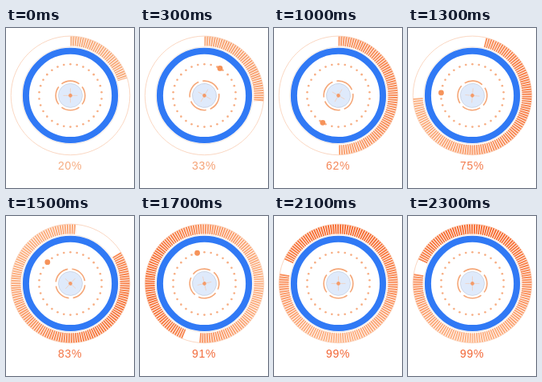
Animation, 160 px wide and 200 px high, one loop 2.4 s. Source, as an HTML page:

```html
<!DOCTYPE html>
<html>
<head>
<meta charset="utf-8">
<style>
html, body { margin: 0; width: 100%; height: 100%; overflow: hidden; background: #fff; }
svg { display: block; width: 160px; height: 200px; }
text { font: 14px "Liberation Sans", Arial, sans-serif; letter-spacing: .7px; text-anchor: middle; }
</style>
</head>
<body>
<svg viewBox="0 0 160 200">
  <defs>
    <linearGradient id="heat" gradientUnits="userSpaceOnUse" x1="70" y1="-25" x2="-70" y2="25">
      <stop id="hot" offset="0"/>
      <stop id="warm" offset="1"/>
    </linearGradient>
  </defs>
  <g fill="none" transform="translate(80.5 84.4)">
    <circle r="74.3" stroke="#f9cdb3" stroke-width=".8"/>
    <path id="ticks" stroke="url(#heat)" stroke-width="12"/>
    <circle r="60.8" stroke="#efd9d0" stroke-width=".6"/>
    <circle r="55.6" stroke="#3079f5" stroke-width="8"/>
    <g id="dots" fill="#f7ad82"></g>
    <circle id="runner" r="3.4" fill="#f6935a"/>
    <g id="core">
      <circle r="18.3" stroke="#f5a778" stroke-width="1.6" pathLength="360" stroke-dasharray="74 16" stroke-dashoffset="37"/>
      <circle r="15" fill="#dfeafb" stroke="#c3cee0" stroke-width=".7"/>
      <path d="M-9 0H9M0-9V9" stroke="#f2cbb6" stroke-width=".7"/>
      <circle r="2.3" fill="#f49b69"/>
    </g>
  </g>
  <text id="label" x="80" y="176.6"></text>
</svg>
<script>
const LOOP = 2400, TICK_RADIUS = 68, TICK_COUNT = 150, DOT_RADIUS = 39.2;
const $ = id => document.getElementById(id);

// Angles are clockwise degrees from the top.
const HEAD = [[0, 73], [600, 123], [1000, 180], [1200, 231], [1500, 366], [1800, 607], [2000, 640], [LOOP, 640]];
const TAIL = [[0, 0], [1000, 0], [1200, 4], [1500, 58], [1800, 260], [2000, 294], [LOOP, 294]];
const RUN = [[150, 0], [600, 93], [1000, 210], [1500, 313], [1780, 360]];

function polar(r, deg) {
  const a = deg * Math.PI / 180;
  return [r * Math.sin(a), -r * Math.cos(a)];
}

// Smooth interpolation that never overshoots its keys.
function follow(keys, t) {
  const last = keys.length - 1;
  if (t <= keys[0][0]) return keys[0][1];
  if (t >= keys[last][0]) return keys[last][1];
  const slope = i => (keys[i + 1][1] - keys[i][1]) / (keys[i + 1][0] - keys[i][0]);
  const tangent = i => {
    if (i === 0) return slope(0);
    if (i === last) return slope(last - 1);
    const a = slope(i - 1), b = slope(i);
    return a * b > 0 ? 2 * a * b / (a + b) : 0;
  };
  let i = 0;
  while (keys[i + 1][0] < t) i++;
  const [t0, v0] = keys[i], [t1, v1] = keys[i + 1];
  const d = t1 - t0, u = (t - t0) / d, w = 1 - u;
  return v0 * w * w * (1 + 2 * u) + v1 * u * u * (3 - 2 * u)
    + d * u * w * (w * tangent(i) - u * tangent(i + 1));
}

function mix(from, to, u) {
  return `rgb(${from.map((c, i) => Math.round(c + (to[i] - c) * u))})`;
}

function arc(r, sweep) {
  return `M${polar(r, 0)}A${r} ${r} 0 ${sweep > 180 ? 1 : 0} 1 ${polar(r, sweep)}`;
}

for (let i = 0; i < 30; i++) {
  const dot = document.createElementNS("http://www.w3.org/2000/svg", "circle");
  const [x, y] = polar(DOT_RADIUS, i * 12);
  dot.setAttribute("cx", x);
  dot.setAttribute("cy", y);
  dot.setAttribute("r", 1.3);
  $("dots").append(dot);
}

const pitch = 2 * Math.PI * TICK_RADIUS / TICK_COUNT;
$("ticks").setAttribute("stroke-dasharray", `${pitch * 0.68} ${pitch * 0.32}`);

function draw(t) {
  const percent = Math.min(99, Math.round(20 + t * 0.042));
  const heat = Math.min(1, t / 1900);

  // The gradient belongs to the band and turns with its tail.
  const tail = follow(TAIL, t);
  $("ticks").setAttribute("d", arc(TICK_RADIUS, follow(HEAD, t) - tail));
  $("ticks").setAttribute("transform", `rotate(${tail})`);
  $("hot").setAttribute("stop-color", mix([248, 173, 126], [246, 107, 48], heat));
  $("warm").setAttribute("stop-color", mix([248, 173, 126], [253, 180, 135], heat));

  const turn = follow(RUN, t);
  const [x, y] = polar(DOT_RADIUS, turn);
  $("runner").setAttribute("cx", x);
  $("runner").setAttribute("cy", y);
  $("runner").setAttribute("visibility", t >= 150 && t < 1780 ? "visible" : "hidden");
  $("core").setAttribute("transform", `rotate(${turn})`);

  $("label").textContent = percent + "%";
  $("label").setAttribute("fill", mix([246, 172, 128], [242, 101, 52], heat));
}

const start = performance.now();
function frame() {
  const elapsed = performance.now() - start;
  draw(Math.floor(elapsed % LOOP / 100) * 100);
  requestAnimationFrame(frame);
}
draw(0);
requestAnimationFrame(frame);
</script>
</body>
</html>
```
